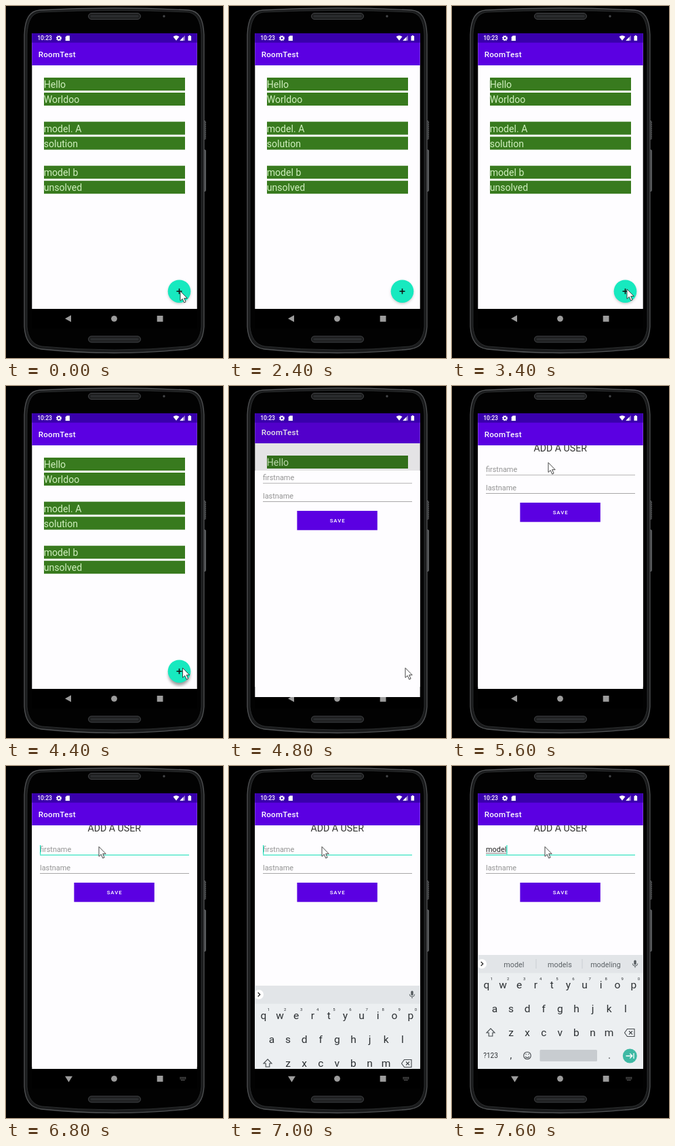
Animation, 320 px wide and 516 px high, one loop 8000 ms. Source, as an HTML page:

```html
<!DOCTYPE html>
<html lang="en">
<head>
<meta charset="utf-8">
<title>Add a user</title>
<style>
  html, body { margin: 0; width: 100%; height: 100%; overflow: hidden; background: #000; }
  svg { display: block; width: 100%; height: 100%; }
  text { font-family: Roboto, sans-serif; white-space: pre; }
  .mid { text-anchor: middle; }
  .row { font-size: 14.1px; fill: #d0efbf; }
  .field { font-size: 10.9px; }
  .bar { font-size: 11.6px; font-weight: 500; letter-spacing: .25px; fill: #fff; }
</style>
</head>
<body>
<svg viewBox="0 0 320 516">
  <defs>
    <clipPath id="screen"><rect x="38.3" y="40" width="243.4" height="433"/></clipPath>
    <clipPath id="page"><rect x="38" y="40" width="244" height="404"/></clipPath>
    <clipPath id="reveal"><rect id="revealBox" x="38" y="39" width="244" height="434"/></clipPath>
    <filter id="blur" x="-50%" y="-50%" width="200%" height="200%"><feGaussianBlur stdDeviation="2"/></filter>
    <g id="header">
      <rect x="38" y="40" width="244" height="47" fill="#5b00e2"/>
      <text class="bar" x="47.7" y="75">RoomTest</text>
    </g>
  </defs>

  <rect width="320" height="516"/>
  <g id="phone">
    <rect x="291" y="168.500" width="3.400" height="27" rx="1" fill="#37393b" stroke="#77797b" stroke-width=".8" stroke-dasharray="2 1"/>
    <rect x="291" y="211" width="3.400" height="60.500" rx="1" fill="#4c4e50" stroke="#77797b" stroke-width=".8"/>
    <path d="M50 6Q160 0 269 6C284 7 291 18 292 42V470C291 488 284 501 267 503Q160 514 52 503C35 501 28 488 27 470V42C28 18 35 7 50 6Z"
      fill="#1a1b1c" stroke="#505254" stroke-width="1.300"/>
    <path d="M52 9Q160 4 267 9C280 10 287 20 288 42V470C287 485 280 497 266 499Q160 509 53 499C39 497 32 485 31 470V42C32 20 39 10 52 9Z"
      fill="#020202" stroke="#343638" stroke-width=".8"/>
    <g fill="#1e1f20" stroke="#414346">
      <rect x="121.5" y="10.5" width="77" height="9" rx="4.5"/>
      <rect x="121.5" y="484" width="77" height="9" rx="4.5"/>
    </g>
    <path d="M126 15H194M126 488.500H194" stroke="#2b2d2f" stroke-width="3" stroke-linecap="round"/>
    <circle cx="233" cy="15" r="1.700" fill="#46484a"/>
  </g>

  <g clip-path="url(#screen)">
    <rect x="38" y="39" width="244" height="434"/>
    <g id="nav" fill="#9c9c9c">
      <path id="back"/>
      <circle cx="159.5" cy="458.300" r="4.400"/>
      <rect x="222.700" y="454" width="8.800" height="8.800"/>
      <path id="imeIcon" d="M256.500 456.500h9M256.500 458.500h9M258 460.500h6" stroke="#8d8d8d" stroke-width="1.200" stroke-dasharray="1.200 .7"/>
    </g>

    <g id="list">
      <rect x="38" y="40" width="244" height="404" fill="#fefdff"/>
      <use href="#header"/>
      <g id="rows"></g>
      <circle id="shadow" cx="255.500" r="16" filter="url(#blur)"/>
      <circle cx="255.500" cy="418.200" r="16.800" fill="#17e9bf"/>
      <path d="M251.500 418.200h8M255.500 414.200v8" stroke="#111" stroke-width="1.600"/>
      <rect id="dim" x="38" y="40" width="244" height="404"/>
    </g>

    <g clip-path="url(#reveal)">
      <g id="form">
        <rect x="38" y="40" width="244" height="404" fill="#fefdff"/>
        <text class="mid" x="159.700" y="96.300" font-size="14.200" fill="#333">ADD A USER</text>
        <use href="#header"/>
        <text id="first" class="field" x="50" y="126.300"></text>
        <path id="line" d="M50 130.500H270"/>
        <path id="typedLine" stroke="#333" stroke-width=".7"/>
        <path id="caret" stroke="#17e0b8" stroke-width="1.200"/>
        <text class="field" x="50" y="153.200" fill="#939393">lastname</text>
        <path d="M50 157.500H270" stroke="#939393" stroke-width=".8"/>
        <rect x="100.400" y="171" width="118.400" height="28.300" fill="#5b00e2"/>
        <text class="mid" x="160.200" y="188.300" font-size="7.800" font-weight="500" letter-spacing="1" fill="#fff">SAVE</text>
      </g>
    </g>

    <g id="status" fill="#fff">
      <rect x="38" y="40" width="244" height="13.700" fill="#3900ac"/>
      <text x="46.200" y="50.400" font-size="8.600" font-weight="500">10:23</text>
      <circle cx="78" cy="47.200" r="2.300" fill="none" stroke="#fff" stroke-width="1.700"/>
      <circle cx="78" cy="47.200" r="3.500" fill="none" stroke="#fff" stroke-width="1.200" stroke-dasharray="1.500 1.250"/>
      <path d="M89.700 43.500h4.200v7.400h-6.200v-5.400z"/>
      <path d="M246.500 45Q251 41.500 255.500 45L251 50.800z"/>
      <path d="M264 43v7.700h-7.700z" fill-opacity=".45"/><path d="M261.500 45.500v5.200h-5.200z"/>
      <path d="M268.500 44h1.300v-1h2v1h1.300v6.800h-4.600z"/>
    </g>

    <g clip-path="url(#page)">
      <g id="keyboard">
        <rect x="38" y="277" width="244" height="168" fill="#eceff1"/>
        <rect x="38" y="277" width="244" height="26.500" fill="#e2e5e8"/>
        <circle cx="44" cy="290" r="7" fill="#fff"/>
        <path d="M42.700 287l3 3-3 3" fill="none" stroke="#333" stroke-width="1.400"/>
        <path id="dividers" d="M124 283v14M192 283v14" stroke="#c6cace" stroke-width=".8"/>
        <g id="hints" class="mid" font-size="10.800" fill="#5c6266"></g>
        <rect x="268.300" y="284.500" width="3.400" height="7" rx="1.700" fill="#555b5f"/>
        <path d="M266.300 289.500a3.700 3.700 0 0 0 7.400 0M270 293.200v2.500" fill="none" stroke="#555b5f"/>
        <g id="keys" class="mid" fill="#2c3033"></g>
        <g fill="none" stroke="#454a4e" stroke-width="1.100">
          <path d="M57 384.800l-6 6.200h3.200v5h5.600v-5h3.200z"/>
          <path d="M254.500 391l4-5.500h10.500v11h-10.500zM261 388.500l5 5M266 388.500l-5 5"/>
          <circle cx="111" cy="424.500" r="5.300"/>
          <path d="M108.200 425.800q2.800 3.600 5.600 0M109.200 421.800v1.400M112.800 421.800v1.400"/>
        </g>
        <rect x="129.500" y="416" width="84.500" height="17" rx="1.500" fill="#c8ccd0"/>
        <circle cx="262.300" cy="425" r="10.500" fill="#3fb9a4"/>
        <path d="M256.500 425h9M262.300 421.500l3.500 3.500-3.500 3.500M268 421v8" fill="none" stroke="#fff" stroke-width="1.300"/>
      </g>
    </g>
  </g>

  <path id="pointer" d="M0 0V14.200L3.300 11.300L5.700 16.800L8.100 15.800L5.700 10.400H10.200Z" fill="#fff" stroke="#333" stroke-width=".9" stroke-linejoin="round"/>
</svg>
<script>
const LOOP = 8000, STEP = 200;
const $ = id => document.getElementById(id);
const set = (id, attrs) => { for (const k in attrs) $(id).setAttribute(k, attrs[k]); };
const show = (id, on) => set(id, { visibility: on ? "visible" : "hidden" });
const label = (s, x, y, size) => `<text x="${x}" y="${y}" font-size="${size}">${s}</text>`;

// Linear interpolation through [time, value, ...] keys.
function at(keys, t) {
  const i = keys.findIndex(k => k[0] > t);
  if (i < 0) return keys[keys.length - 1].slice(1);
  if (i === 0) return keys[0].slice(1);
  const a = keys[i - 1], b = keys[i], p = (t - a[0]) / (b[0] - a[0]);
  return a.slice(1).map((v, j) => v + (b[j + 1] - v) * p);
}

const users = [["Hello", "Worldoo"], ["model. A", "solution"], ["model b", "unsolved"]];
$("rows").innerHTML = users.map((pair, i) => pair.map((name, j) => {
  const y = 105 + i * 64.6 + j * 22;
  return `<rect x="56" y="${y}" width="208" height="19" fill="#387a1e"/>
    <text class="row" x="55.700" y="${y + 15}">${name}</text>`;
}).join("")).join("");

const keyRow = (s, x, y) => [...s].map((c, i) => label(c, x + i * 24.1, y, 15.5)).join("");
$("keys").innerHTML = keyRow("qwertyuiop", 51, 326) + keyRow("asdfghjkl", 63, 361) +
  keyRow("zxcvbnm", 87, 396) + label("?123", 57, 428.3, 10) + label(",", 87, 429, 14) + label(".", 232, 429, 14) +
  [..."1234567890"].map((c, i) => label(c, 58.5 + i * 24.1, 314, 6)).join("");

const typing = [
  [7200, "m", ["m", "my", "me"]],
  [7400, "mod", ["mod", "mode", "model"]],
  [7600, "model", ["model", "models", "modeling"]]
];
const pointerPath = [
  [0, 257, 418], [400, 257, 418], [600, 253, 417.5], [800, 261, 417.5], [2200, 261, 417.5],
  [2600, 150, 490], [2800, 74, 250], [3000, 110, 86], [3200, 220, 270], [3400, 258, 415],
  [3600, 260.5, 413.3], [4400, 260.5, 413.3], [4800, 260, 413.3], [5000, 250, 380],
  [5200, 190, 230], [5400, 150, 125], [5600, 142, 112.3], [5800, 140, 115], [6000, 137, 118.3]
];
const slide = [[4600, 200, 17], [4800, 124, 12], [5000, 52, 4], [5200, 39, 1], [5400, 39, 0]];

let drawnHints = null;
function draw(ms) {
  const t = Math.floor(ms / STEP) * STEP;
  const opened = t >= 4800, focused = t >= 6200, ime = t >= 6400;

  const [x, y] = at(pointerPath, t);
  set("pointer", { transform: `translate(${x} ${y})` });
  show("pointer", t !== 2400);

  const [lift] = at([[3800, 0], [4400, 1]], t);
  set("shadow", { cy: 420 + lift * 3, "fill-opacity": .28 + lift * .1 });

  const [top, shift] = at(slide, t);
  set("list", { transform: `translate(0 ${opened ? -3 : 0})` });
  set("dim", { "fill-opacity": opened ? .1 : 0 });
  set("revealBox", { y: top, height: 473 - top });
  set("form", { transform: `translate(0 ${shift})` });
  show("form", opened);

  const entry = typing.filter(e => t >= e[0]).pop();
  const first = $("first");
  first.textContent = entry ? entry[1] : "firstname";
  first.setAttribute("fill", entry ? "#222" : "#939393");
  const end = entry ? 50 + first.getComputedTextLength() : 50;
  set("line", { stroke: focused ? "#17e0b8" : "#a8a8a8", "stroke-width": focused ? 1.1 : .8 });
  set("typedLine", { d: entry ? `M50 128H${end}` : "" });
  set("caret", { d: focused ? `M${end + .6} 116V129.500` : "" });

  set("back", { d: ime ? "M87 454.700H98L92.500 463.500Z" : "M87 458.300L96 453.300V463.300Z" });
  show("imeIcon", ime);

  show("keyboard", t >= 7000);
  set("keyboard", { transform: `translate(0 ${at([[6800, 168], [7000, 45], [7200, 0]], t)[0]})` });
  const hints = entry ? entry[2] : null;
  if (hints !== drawnHints) {
    $("hints").innerHTML = (hints || []).map((s, i) => label(s, 91.3 + i * 67.6, 294.5, 10.8)).join("");
    drawnHints = hints;
  }
  show("dividers", hints);
}

const start = performance.now();
function tick() {
  draw((performance.now() - start) % LOOP);
  requestAnimationFrame(tick);
}
tick();
</script>
</body>
</html>
```
